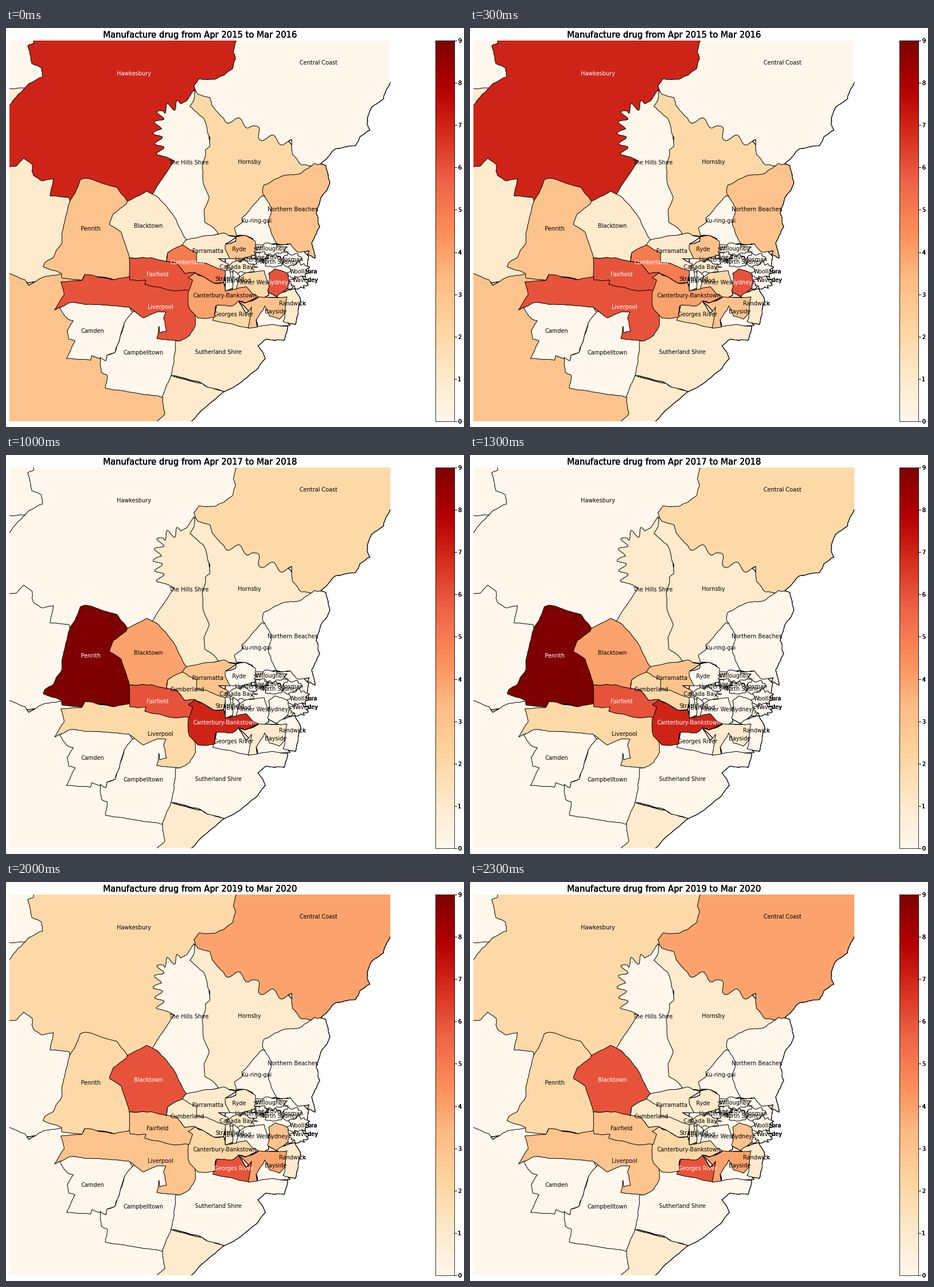
These frames come from a looping animation (802x699 px, 2500 ms). A matplotlib script:

```python
import numpy as np
import matplotlib.pyplot as plt
from matplotlib.animation import FuncAnimation
from matplotlib.patches import Polygon, Rectangle

W, H, DPI = 802, 699, 72
LEFT, TOP, SIDE = 6, 22, 667
VMAX = 9
OVERDRAW = 4  # repeated drawing gives the heavier look outside the land
NONE = (0, 0, 0, 0, 0)

plt.rcParams["font.family"] = "DejaVu Sans"
cmap = plt.get_cmap("OrRd")
rng = np.random.default_rng(5)

fig = plt.figure(figsize=(W / DPI, H / DPI), dpi=DPI, facecolor="white")
ax = fig.add_axes([0, 0, 1, 1])
ax.axis("off")
window = Rectangle((LEFT, TOP), SIDE, SIDE, transform=ax.transData)

areas = []
labels = []


def fray(a, b, amp):
    """Midpoint displacement from a up to, but without, b."""
    size = np.hypot(*(b - a))
    if size < 5:
        return [a]
    mid = (a + b) / 2 + rng.normal(0, amp * min(1, size / 25), 2)
    return fray(a, mid, amp) + fray(mid, b, amp)


def meander(points, depth, wave):
    """River bends: a sine swung across the path through the points."""
    pts = np.array(points, float)
    steps = np.hypot(*np.diff(pts, axis=0).T)
    dist = np.concatenate([[0], np.cumsum(steps)])
    s = np.arange(0, dist[-1], 2.5)
    path = np.column_stack([np.interp(s, dist, pts[:, k]) for k in (0, 1)])
    along = np.gradient(path, axis=0)
    across = np.column_stack([-along[:, 1], along[:, 0]])
    across /= np.hypot(*across.T)[:, None]
    swing = depth * np.sin(2 * np.pi * s / wave)
    return [tuple(p) for p in path + across * swing[:, None]]


def region(values, points, amp=0.7):
    pts = np.array(points, float)
    outline = [p for a, b in zip(pts, np.roll(pts, -1, axis=0)) for p in fray(a, b, amp)]
    style = dict(edgecolor="black", linewidth=1, joinstyle="round")
    for _ in range(OVERDRAW):
        ax.add_patch(Polygon(outline, fill=False, zorder=1, **style)).set_clip_path(window)
    patch = ax.add_patch(Polygon(outline, zorder=2, **style))
    patch.set_clip_path(window)
    areas.append((patch, values))


def label(name, x, y, values):
    style = dict(fontsize=9.8, ha="center", va="baseline")
    for _ in range(OVERDRAW):
        ax.text(x, y + 4, name, zorder=1, **style)
    labels.append((ax.text(x, y + 4, name, zorder=3, **style), values))


def place(name, x, y, values, points, amp=0.7):
    region(values, points, amp)
    label(name, x, y, values)


def cove(name, x, y, centre, radii, values=NONE):
    """Harbour district: an ellipse with a ragged shore."""
    a = np.linspace(0, 2 * np.pi, 30, endpoint=False)
    reach = rng.uniform(0.65, 1.2, a.size)[:, None]
    ring = np.array(centre) + reach * np.array(radii) * np.column_stack([np.cos(a), np.sin(a)])
    place(name, x, y, values, ring)


# Western and northern country; later areas cover the earlier ones
region((1, 1, 0, 0, 0), [(-20, 90), (120, 90), (120, 445), (-20, 445)])
region((0, 0, 0, 1, 0), [(-20, 107), (33, 105), (41, 97), (70, 90), (70, -20), (-20, -20)])
region((3, 1, 0, 3, 0), [
    (-20, 428), (6, 430), (33, 441), (40, 451), (66, 436), (98, 431),
    (200, 440), (285, 612), (280, 720), (-20, 720)])
place("Hawkesbury", 224, 79, (7, 1, 0, 1, 2), [
    (46, 0), (48, 27), (38, 31), (45, 62), (62, 70), (64, 86), (41, 97), (20, 118),
    (6, 136), (-20, 140), (-20, 243), (18, 242), (31, 228), (46, 239), (48, 258), (64, 268),
    (83, 264), (77, 294), (110, 297), (112, 304), (150, 330), (260, 310), (340, 150),
    (425, 100), (425, 0)], 0.9)

creek = meander([(306, 133), (273, 143), (264, 178), (272, 226)], 8, 18)
place("The Hills Shire", 320, 235, (0, 0, 1, 0, 0), [
    (329, 108), (317, 127), *creek, (281, 226), (295, 233), (255, 293), (258, 310),
    (300, 378), (372, 361), (372, 300), (350, 150)], 0.4)
place("Hornsby", 426, 234, (2, 1, 1, 0, 1), [
    (332, 106), (328, 128), (322, 137), (346, 158), (357, 192), (357, 207), (349, 214),
    (344, 240), (345, 270), (356, 297), (347, 318), (348, 340), (366, 353), (372, 361),
    (403, 365), (470, 330), (525, 265), (535, 240), (450, 150), (400, 130)])

river = meander([(381, 158), (430, 170), (447, 190), (500, 202)], 7, 35)
place("Central Coast", 547, 60, (0, 2, 2, 3, 4), [
    (404, 0), (404, 21), (398, 42), (402, 52), (397, 71), (365, 90), (338, 89), (329, 101),
    (336, 116), (357, 122), (361, 136), *river, (502, 222), (518, 240), (548, 241),
    (576, 212), (612, 206), (620, 190), (637, 179), (632, 168), (640, 139), (661, 124),
    (667, 106), (674, 93), (700, 90), (700, 0)], 1)
place("Ku-ring-gai", 439, 337, NONE, [
    (403, 363), (400, 350), (415, 339), (413, 333), (448, 294), (475, 300), (480, 377),
    (437, 383), (432, 369), (421, 364)])

# Harbour and bay waters
region(NONE, [
    (384, 405), (436, 380), (505, 378), (530, 400), (525, 430), (500, 457), (400, 458),
    (384, 440)])
region(NONE, [(441, 524), (438, 500), (453, 480), (490, 485), (490, 510), (497, 521)])
place("Northern Beaches", 502, 317, (3, 0, 0, 1, 0), [
    (449, 285), (452, 275), (487, 258), (513, 256), (540, 237), (560, 241), (567, 271),
    (551, 298), (543, 325), (549, 347), (535, 377), (541, 403), (528, 397), (531, 390),
    (512, 393), (498, 378), (474, 378), (460, 346), (465, 315)], 1.3)

# Outer west and south
place("Penrith", 148, 351, (3, 4, 9, 3, 2), [
    (112, 303), (126, 278), (130, 266), (139, 263), (194, 279), (216, 307), (230, 330),
    (217, 441), (190, 441), (138, 432), (133, 442), (98, 438), (97, 430), (65, 418),
    (68, 411), (83, 402), (98, 376), (104, 334)])
place("Blacktown", 249, 346, (1, 1, 4, 1, 6), [
    (212, 304), (246, 286), (267, 297), (291, 325), (316, 371), (309, 381), (283, 394),
    (281, 409), (240, 402), (216, 403), (202, 358), (181, 344), (188, 325), (211, 308)])
place("Camden", 152, 530, (0, 1, 0, 1, 0), [
    (94, 490), (112, 480), (215, 486), (222, 499), (207, 517), (199, 546), (191, 568),
    (177, 573), (175, 583), (150, 574), (148, 582), (106, 579), (121, 548), (110, 545),
    (107, 530), (118, 513), (108, 510)])
place("Campbelltown", 241, 568, (0, 2, 0, 2, 0), [
    (222, 497), (207, 517), (199, 546), (191, 568), (177, 573), (175, 583), (165, 577),
    (167, 603), (177, 608), (174, 631), (274, 647), (290, 608), (310, 570), (300, 530),
    (285, 495)])
place("Sutherland Shire", 372, 567, (1, 1, 0, 1, 0), [
    (297, 548), (305, 548), (331, 500), (365, 500), (441, 523), (493, 522), (487, 547),
    (455, 545), (441, 557), (454, 579), (437, 600), (405, 625), (382, 637), (352, 629),
    (344, 623), (289, 609)], 1)
region((1, 1, 1, 0, 1), [
    (289, 609), (344, 623), (352, 629), (382, 637), (352, 662), (323, 690), (320, 720),
    (266, 720), (265, 688), (278, 677), (274, 645)])
place("Liverpool", 270, 488, (6, 2, 2, 5, 3), [
    (133, 442), (138, 432), (190, 441), (245, 430), (320, 445), (340, 490), (331, 499),
    (332, 520), (322, 538), (305, 548), (264, 544), (268, 523), (269, 534), (281, 531),
    (276, 508), (280, 498), (266, 497), (240, 508), (215, 489), (112, 481), (85, 494),
    (102, 467), (96, 445)])

# Inner west
place("Cumberland", 317, 410, (5, 0, 2, 4, 1), [
    (309, 380), (283, 394), (281, 409), (297, 411), (313, 430), (331, 429), (364, 447),
    (381, 446), (384, 432), (388, 418), (330, 380)])
place("Parramatta", 353, 390, (1, 0, 3, 1, 1), [
    (316, 371), (381, 359), (404, 366), (385, 378), (392, 404), (372, 404), (389, 413),
    (386, 426), (350, 412), (334, 411), (334, 394), (309, 380)])
place("Fairfield", 265, 431, (6, 5, 6, 5, 3), [
    (216, 403), (240, 402), (297, 411), (313, 430), (331, 428), (323, 460), (285, 459),
    (243, 449), (245, 442), (217, 441)])
place("Ryde", 408, 387, (3, 0, 0, 1, 1), [
    (384, 379), (402, 374), (403, 366), (421, 364), (437, 374), (437, 397), (410, 405),
    (392, 404), (384, 388)])
cove("Willoughby", 464, 386, (464, 388), (29, 10))
cove("Lane Cove", 455, 401, (447, 400), (13, 8))
cove("Hunters Hill", 430, 405, (427, 408), (16, 6))
cove("North Sydney", 478, 409, (468, 408), (18, 10))
cove("Mosman", 500, 405, (499, 406), (17, 12))
cove("Canada Bay", 403, 418, (412, 419), (25, 12), (1, 0, 0, 0, 1))
place("Inner West", 436, 445, (2, 1, 0, 1, 0), [
    (405, 440), (420, 429), (452, 425), (461, 452), (460, 468), (446, 474), (402, 459)], 1)
place("Strathfield", 392, 439, (0, 0, 0, 1, 1), [
    (384, 425), (392, 424), (399, 455), (384, 461)])
place("Burwood", 407, 442, NONE, [(397, 424), (409, 434), (403, 459), (397, 459)])
cove("Woollahra", 521, 426, (512, 426), (18, 14))
cove("Waverley", 524, 441, (512, 446), (18, 10))
place("Sydney", 476, 445, (6, 0, 0, 1, 3), [
    (460, 430), (471, 422), (494, 431), (494, 455), (474, 470), (458, 461)], 1.5)
place("Randwick", 501, 482, (1, 0, 0, 1, 1), [
    (474, 470), (484, 463), (506, 457), (516, 478), (507, 519), (485, 514), (488, 500),
    (485, 480)], 1.3)
place("Bayside", 472, 496, (3, 2, 1, 1, 4), [
    (407, 478), (418, 482), (443, 471), (492, 471), (488, 500), (479, 510), (462, 505),
    (453, 487), (438, 512), (440, 524), (424, 526), (428, 500)])
place("Georges River", 399, 501, (2, 0, 0, 1, 6), [
    (368, 486), (407, 478), (420, 500), (430, 489), (424, 525), (362, 512)])
place("Canterbury-Bankstown", 383, 468, (4, 6, 7, 7, 2), [
    (331, 429), (364, 447), (381, 446), (384, 461), (420, 453), (431, 465), (442, 471),
    (419, 481), (407, 478), (396, 487), (368, 486), (366, 506), (336, 508), (321, 492),
    (319, 463), (327, 442), (319, 437)], 0.9)

# Colour scale
bar_x, bar_w = 752, SIDE / 20
bar_end = bar_x + bar_w
ax.imshow(np.linspace(1, 0, 256)[:, None], cmap=cmap, vmin=0, vmax=1, aspect="auto",
          extent=(bar_x, bar_end, TOP + SIDE, TOP))
ax.add_patch(Rectangle((bar_x, TOP), bar_w, SIDE, fill=False, linewidth=0.8, zorder=3))
for v in range(VMAX + 1):
    y = TOP + SIDE * (1 - v / VMAX)
    for _ in range(OVERDRAW):
        ax.plot([bar_end, bar_end + 3.5], [y, y], color="black", linewidth=0.8)
        ax.text(bar_end + 5.8, y + 4, str(v), fontsize=9.8, va="baseline")

titles = [ax.text(LEFT + SIDE / 2, 17, "", fontsize=14.75, ha="center", va="baseline")
          for _ in range(OVERDRAW)]

ax.set_xlim(0, W)
ax.set_ylim(H, 0)


def update(i):
    for patch, values in areas:
        patch.set_facecolor(cmap(values[i] / VMAX))
    for text, values in labels:
        text.set_color("white" if values[i] >= 5 else "black")
    for title in titles:
        title.set_text(f"Manufacture drug from Apr {2015 + i} to Mar {2016 + i}")
    return []


anim = FuncAnimation(fig, update, frames=5, interval=500, repeat=True)
plt.show()
```
